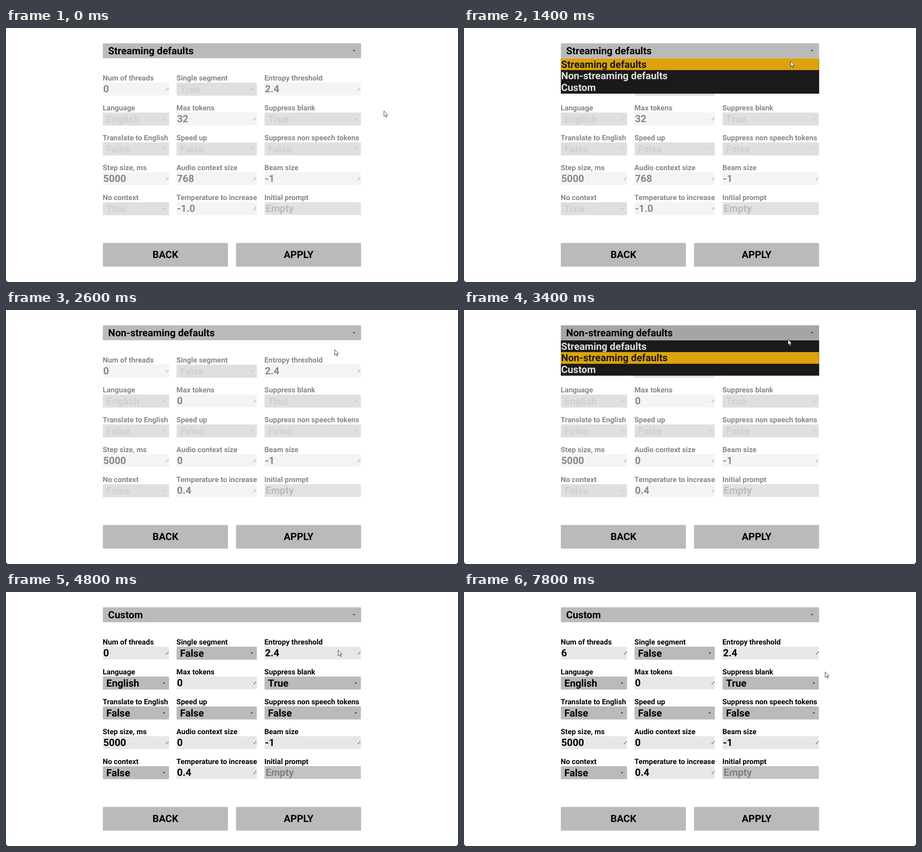
Recreate the animation shown at these times as an HTML page. Size 998 px wide and 561 px high, loop 8 s.

```html
<!DOCTYPE html>
<html lang="en">
<head>
<meta charset="utf-8">
<title>Settings form</title>
<style>
  html, body { margin: 0; width: 100%; height: 100%; overflow: hidden; background: #fff; }
  svg { display: block; font: 700 22px Roboto, "Open Sans", sans-serif; text-rendering: geometricPrecision; }
  .label { font-size: 16.2px; }
  .mid { text-anchor: middle; }
</style>
</head>
<body>
<svg id="stage" width="998" height="561" viewBox="0 0 998 561"></svg>
<script>
const LOOP = 8000, STEP = 200 / 3;
const COLS = [{ x: 213.8, w: 146.2 }, { x: 376.6, w: 177.2 }, { x: 570.8, w: 212.8 }];
const MODES = ["Streaming defaults", "Non-streaming defaults", "Custom"];

// kind: n = number, c = combo, p = prompt; a pair holds streaming / other values
const FIELDS = [
  [["Num of threads", "n", "0"], ["Single segment", "c", ["True", "False"]], ["Entropy threshold", "n", "2.4"]],
  [["Language", "c", "English"], ["Max tokens", "n", ["32", "0"]], ["Suppress blank", "c", "True"]],
  [["Translate to English", "c", "False"], ["Speed up", "c", "False"], ["Suppress non speech tokens", "c", "False"]],
  [["Step size, ms", "n", "5000"], ["Audio context size", "n", ["768", "0"]], ["Beam size", "n", "-1"]],
  [["No context", "c", ["True", "False"]], ["Temperature to increase", "n", ["-1.0", "0.4"]], ["Initial prompt", "p", "Empty"]]
];

const smooth = p => p * p * (3 - 2 * p);
const out = p => 1 - (1 - p) ** 1.7;
const linear = p => p;

// pointer moves: start, end, target, easing, optional control point
const START = [834.4, 183];
const MOVES = [
  [400, 930, [718, 46], smooth, [790, 110]],
  [1130, 1670, [735, 106], smooth, [716, 70]],
  [2330, 3200, [715, 66], out],
  [3200, 3270, [715.4, 65], linear],
  [3400, 3930, [732, 126], smooth],
  [4000, 4070, [733.4, 128.5], linear],
  [5000, 5600, [272, 137], smooth, [520, 197]],
  [5600, 5800, [278.6, 136], smooth],
  [6200, 6400, [311, 136.5], smooth],
  [6600, 7470, [792, 175], smooth, [480, 176]],
  [7470, 7600, [797.4, 176.4], linear]
];

function pointerAt(t) {
  let from = START;
  for (const [a, b, to, ease, via] of MOVES) {
    if (t <= a) break;
    if (t < b) {
      const p = ease((t - a) / (b - a)), q = 1 - p;
      return from.map((v, i) => via
        ? q * q * v + 2 * p * q * via[i] + p * p * to[i]
        : q * v + p * to[i]);
    }
    from = to;
  }
  return from;
}

const within = (t, a, b) => t >= a && t < b;
const clamp = v => Math.max(0, Math.min(1, v));
const rect = (x, y, w, h, fill, r = 0) =>
  `<rect x="${x}" y="${y}" width="${w}" height="${h}" rx="${r}" fill="${fill}"/>`;
const text = (x, y, s, fill, cls = "") =>
  `<text x="${x}" y="${y}" fill="${fill}" class="${cls}">${s}</text>`;
const path = (x, y, d, attrs) => `<path transform="translate(${x} ${y})" d="${d}" ${attrs}/>`;
const caretDown = (x, y, fill) => path(x, y, "M-2.4-1.1h4.8l-2.4 2.6z", `fill="${fill}"`);
const spinner = (x, y, fill) => path(x, y, "M0-2.4h2.4v2.8zM-2.4-.4v2.8h2.6z", `fill="${fill}"`);

function button(x, label) {
  return rect(x, 474.8, 276.2, 52.2, "#bababa", 1.5) + text(x + 138.2, 508.3, label, "#000", "mid");
}

function header(mode, hover) {
  return rect(213.8, 33.8, 570.2, 33, hover ? "#a5a5a5" : "#bababa", 1.5) +
    text(225.6, 57.8, MODES[mode], "#000") + caretDown(768.2, 50, "#000");
}

function menu(selected, y) {
  let s = rect(213.8, 67, 570.4, 78, "#1a1a1a");
  MODES.forEach((name, i) => {
    const top = 67 + i * 25.9, gold = i === selected;
    const hover = y >= top && y < top + 25.9;
    if (gold || hover) s += rect(214.2, top, 569.6, 25.9, gold ? "#dda20e" : "#323232");
    s += text(214.4, top + 20.5, name, gold ? "#1a1a1a" : "#dedede");
  });
  return s;
}

function field(row, col, [label, kind, value], state) {
  const { x, w } = COLS[col], on = state.mode === 2;
  const first = row === 0 && col === 0, focus = first && state.focus;
  const y = row * 66 + (row === 3 && col === 0 && state.focus ? 0.7 : 0);
  const ink = on ? "#000" : "#888";
  let v = Array.isArray(value) ? value[state.mode ? 1 : 0] : value;
  if (first && state.typed) v = "6";

  let s = text(x - 0.3, y + 115.5, label, ink, "label");
  if (kind === "c") {
    s += rect(x, y + 120.8, w, 28.6, on ? "#bababa" : "#dfdfdf", 1.5) +
      text(x + 7.7, y + 142.7, v, on ? "#000" : "#d0d0d0") +
      caretDown(x + w - 11.2, y + 135, on ? "#000" : "#b4b4b4");
  } else if (kind === "p") {
    s += rect(x, y + 120.6, w, 28.2, on ? "#c3c3c3" : "#e2e2e2") +
      text(x + 2.4, y + 142.3, v, on ? "#808080" : "#bcbcbc");
  } else {
    s += rect(x, y + 120.6, w, 28.4, focus ? "#dcdcdc" : on ? "#e7e7e7" : "#f4f4f4", 1);
    if (focus && !state.typed) s += rect(216.4, 122, 13.6, 25, "#0b6cd8");
    s += text(x + (focus ? 2.6 : 0.9), y + 142.3, v, ink) +
      spinner(x + w - 4, y + 135, on ? "#222" : "#777");
    if (focus) s += `<g opacity="${state.caret}">${rect(229.4, 121.5, 1.2, 25.5, "#000")}</g>`;
  }
  return s;
}

function pointer([x, y], overText) {
  return overText
    ? path(x, y, "M-2.5-6h2l.5.5.5-.5h2M0-5.5v11M-2.5 6h2l.5-.5.5.5h2", 'fill="none" stroke="#333" stroke-width="1"')
    : path(x, y, "M0 0V12.2L2.8 9.6L4.8 14.3L6.7 13.5L4.8 9H8.5Z", 'fill="#fff" stroke="#222" stroke-width=".9"');
}

function draw(t) {
  const pos = pointerAt(t), [x, y] = pos;
  const mode = t < 2130 ? 0 : t < 4800 ? 1 : 2;
  const open = within(t, 1130, 2130) || within(t, 3330, 4800);
  const selected = t < 2070 ? 0 : t < 4670 ? 1 : 2;
  const state = {
    mode,
    focus: within(t, 6130, 7800),
    typed: t >= 6670,
    caret: clamp((t - 6200) / 200) * (1 - clamp((t - 7470) / 130))
  };
  const overHeader = y > 34 && y < 65.5 && x < 784;
  const overText = mode === 2 && x > 214 && x < 360 && y > 121 && y < 149;

  let s = rect(0, 0, 998, 561, "#fff") + header(mode, overHeader);
  FIELDS.forEach((line, row) => line.forEach((f, col) => s += field(row, col, f, state)));
  s += button(213.8, "BACK") + button(507.8, "APPLY");
  if (open) s += menu(selected, y);
  s += path(0, 561, "M0-6Q0 0 6 0H0z", "") + path(998, 561, "M0-6Q0 0-6 0H0z", "");
  return s + pointer(pos, overText);
}

const stage = document.getElementById("stage");
const begin = performance.now();
let shown = -1;

function frame() {
  const t = Math.max(0, performance.now() - begin) % LOOP;
  const step = Math.floor((t + 3.4) / STEP) % 120;
  if (step !== shown) {
    shown = step;
    stage.innerHTML = draw(Math.round(step * STEP / 10) * 10);
  }
  requestAnimationFrame(frame);
}
frame();
</script>
</body>
</html>
```
